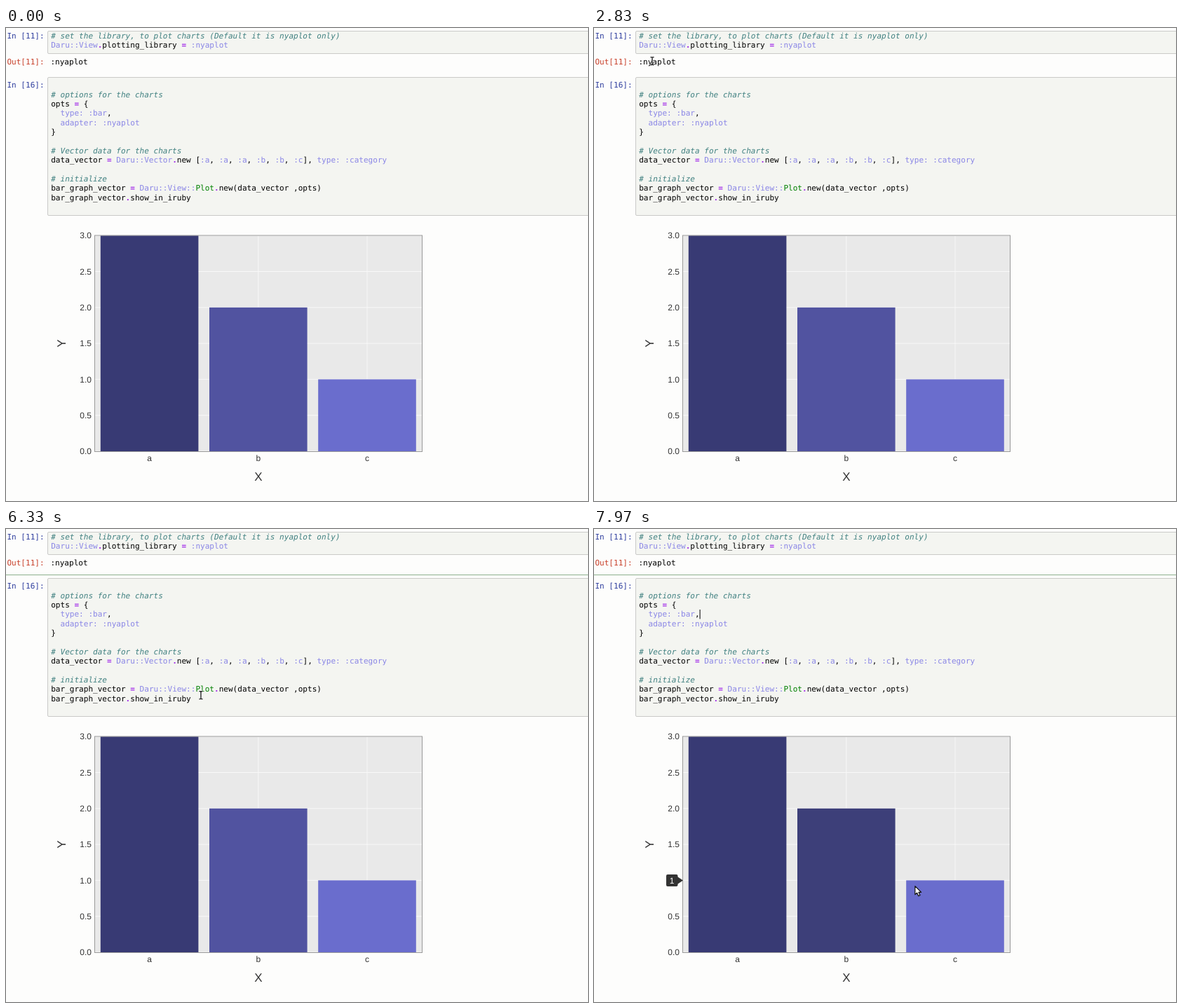
An HTML page that plays this animation: 830x675 px, repeating every 8 s.

```html
<!DOCTYPE html>
<html lang="en">
<head>
<meta charset="utf-8">
<title>Notebook bar chart</title>
<style>
html, body { margin: 0; width: 100%; height: 100%; overflow: hidden; background: #fdfdfc; }
svg { display: block; width: 830px; height: 675px; }
text { white-space: pre; text-rendering: geometricPrecision; }
.code { font: 11.06px "DejaVu Sans Mono", monospace; fill: #000; }
.comment { fill: #408080; font-style: italic; }
.const { fill: #008000; }
.atom { fill: #8a86e6; }
.op { fill: #a22be8; font-weight: bold; }
.in { fill: #303f9f; }
.out { fill: #c8402a; }
.tick { font: 12px "Liberation Sans", Arial, sans-serif; fill: #333; }
.title { font: 17px "Liberation Sans", Arial, sans-serif; fill: #333; text-anchor: middle; }
.cell { fill: #f4f5f1; stroke: #cacac8; }
</style>
</head>
<body>
<svg id="stage" viewBox="0 0 830 675"></svg>
<script>
const LOOP = 8000;
const stage = document.getElementById('stage');

function add(tag, attrs, parent = stage) {
  const node = document.createElementNS('http://www.w3.org/2000/svg', tag);
  for (const key in attrs) node.setAttribute(key, attrs[key]);
  parent.appendChild(node);
  return node;
}

function label(x, y, str, cls, extra = {}, parent = stage) {
  const node = add('text', { x, y, class: cls, ...extra }, parent);
  node.textContent = str;
  return node;
}

const rect = (x, y, width, height, attrs) => add('rect', { x, y, width, height, ...attrs });
const show = (node, on) => node.setAttribute('visibility', on ? 'visible' : 'hidden');

// Syntax colouring
const TOKEN = /(#.*)|(Plot)|(Daru::(?:View|Vector)(?:::)?|:\w+|\b(?:type|adapter):)|([=.])/g;
const KINDS = ['comment', 'const', 'atom', 'op'];

function code(x, y, str) {
  const line = add('text', { x, y, class: 'code' });
  const span = (s, cls) => { if (s) add('tspan', cls ? { class: cls } : {}, line).textContent = s; };
  let end = 0;
  for (const m of str.matchAll(TOKEN)) {
    span(str.slice(end, m.index));
    span(m[0], KINDS[m.slice(1).findIndex(Boolean)]);
    end = m.index + m[0].length;
  }
  span(str.slice(end));
}

// Notebook cells
rect(59.5, 4.5, 800, 32, { class: 'cell', rx: 1.5 });
rect(59.5, 70.5, 800, 197, { class: 'cell', rx: 1.5 });
const focusLine = rect(0, 65, 830, 1, { fill: '#8db08d' });
const selection = add('path', { d: 'M150.8 115H826V128.4H150.8ZM64 128.4H77.5V141.6H64Z', fill: '#d5d2ea' });

label(1.4, 15, 'In [11]:', 'code in');
label(1.4, 52, 'Out[11]:', 'code out');
label(1.4, 85, 'In [16]:', 'code in');
label(63.4, 52, ':nyaplot', 'code');
code(64.2, 15, '# set the library, to plot charts (Default it is nyaplot only)');
code(64.2, 28, 'Daru::View.plotting_library = :nyaplot');
[
  '# options for the charts',
  'opts = {',
  '  type: :bar,',
  '  adapter: :nyaplot',
  '}',
  '',
  '# Vector data for the charts',
  'data_vector = Daru::Vector.new [:a, :a, :a, :b, :b, :c], type: :category',
  '',
  '# initialize',
  'bar_graph_vector = Daru::View::Plot.new(data_vector ,opts)',
  'bar_graph_vector.show_in_iruby'
].forEach((str, i) => code(64.2, Math.round(98.7 + 13.37 * i), str));
const caret = rect(150.6, 115, 1, 13.4, { fill: '#000' });

// Chart
const yOf = v => 604 - v * 102.6;
rect(126.5, 296, 467, 308.5, { fill: '#e9e9e9' });
for (let v = 0; v <= 3; v += 0.5) {
  rect(127, yOf(v) - 0.5, 466, 1, { fill: '#f8f8f8' });
  label(122, yOf(v) + 4.2, v.toFixed(1), 'tick', { 'text-anchor': 'end' });
}

const bars = [
  { name: 'a', value: 3, color: [56, 58, 116], from: 6760, to: 7515 },
  { name: 'b', value: 2, color: [81, 83, 160], from: 7555, to: 7915 },
  { name: 'c', value: 1, color: [106, 109, 205], from: 7945, to: LOOP }
];
bars.forEach((bar, i) => {
  const x = 134.8 + i * 155.2, y = yOf(bar.value);
  rect(x + 69.3, 296, 1, 308, { fill: '#f8f8f8' });
  bar.node = rect(x, y, 139.6, 604 - y, {});
  label(x + 69.8, 618, bar.name, 'tick', { 'text-anchor': 'middle' });
});
rect(126.5, 296, 467, 308.5, { fill: 'none', stroke: '#999' });
label(359.8, 646, 'X', 'title');
label(0, 0, 'Y', 'title', { transform: 'translate(85 450) rotate(-90)' });

const tip = add('g', {});
add('path', { d: 'M105 -8.5H117.5Q119.5 -8.5 119.5 -6.5V-5L127 0L119.5 5V6.5Q119.5 8.5 117.5 8.5H105Q103 8.5 103 6.5V-6.5Q103 -8.5 105 -8.5Z', fill: '#333' }, tip);
const tipText = label(111.2, 4.2, '', 'tick', { 'text-anchor': 'middle', style: 'fill:#fff' }, tip);

// Mouse pointers
const arrow = add('path', {
  d: 'M.5 .5V12.5L3.3 10L5.3 14.5L7.6 13.5L5.6 9.2H9.3Z',
  fill: '#fff', stroke: '#111', 'stroke-width': 1.2, 'stroke-linejoin': 'round'
});
const beam = add('g', { fill: 'none' });
const BEAM = 'M-2.5 -5.5H-1L0 -4.8L1 -5.5H2.5M0 -5V5M-2.5 5.5H-1L0 4.8L1 5.5H2.5';
add('path', { d: BEAM, stroke: '#fff', 'stroke-width': 2.6 }, beam);
add('path', { d: BEAM, stroke: '#111', 'stroke-width': 1.3 }, beam);

// Mouse path: time, x, y
const path = [
  [900, -8, 330], [1180, 24, 215], [1270, 26, 209], [1480, 34, 180], [1700, 72, 70],
  [2050, 140, 34], [2500, 90, 40], [2830, 83, 47], [3100, 88, 58], [3370, 100, 92],
  [3800, 200, 118], [4200, 205, 126], [4600, 186, 123], [5170, 183, 128], [5700, 186, 124],
  [5850, 200, 140], [6330, 278, 237], [6640, 262, 278], [6760, 254, 298], [7100, 225, 364],
  [7400, 252, 398], [7560, 292, 425], [7970, 457, 509], [8000, 468, 514]
];

function mouseAt(t) {
  const i = path.findIndex(p => p[0] > t);
  if (i < 1) return null;
  const [t0, x0, y0] = path[i - 1], [t1, x1, y1] = path[i];
  const k = (t - t0) / (t1 - t0);
  return [x0 + (x1 - x0) * k, y0 + (y1 - y0) * k];
}

function ease(k) {
  k = Math.min(1, Math.max(0, k));
  return k < 0.5 ? 4 * k ** 3 : 1 - 4 * (1 - k) ** 3;
}

function draw(t) {
  const CLICK = 4600, SELECT = 4820, CLEAR = 5700, BLINK = 530;
  show(focusLine, t >= CLICK);
  show(selection, t >= SELECT && t < CLEAR);
  const since = t >= CLEAR ? t - CLEAR : t - CLICK;
  show(caret, t >= CLICK && !(t >= SELECT && t < CLEAR) && since % (2 * BLINK) < BLINK);

  let active = null;
  for (const bar of bars) {
    const dark = ease((t - bar.from) / 200) - ease((t - bar.to) / 200);
    bar.node.setAttribute('fill', `rgb(${bar.color.map(c => Math.round(c * (1 - 0.27 * dark)))})`);
    if (t >= bar.from && t < bar.to) active = bar;
  }
  show(tip, active);
  if (active) {
    tip.setAttribute('transform', `translate(0 ${yOf(active.value)})`);
    tipText.textContent = active.value;
  }

  const mouse = mouseAt(t);
  const overText = mouse && mouse[0] > 60 && mouse[1] < 268;
  show(arrow, mouse && !overText);
  show(beam, overText);
  if (mouse) (overText ? beam : arrow).setAttribute('transform', `translate(${mouse})`);
}

const start = performance.now();
function tick() {
  draw((performance.now() - start) % LOOP);
  requestAnimationFrame(tick);
}
tick();
</script>
</body>
</html>
```
